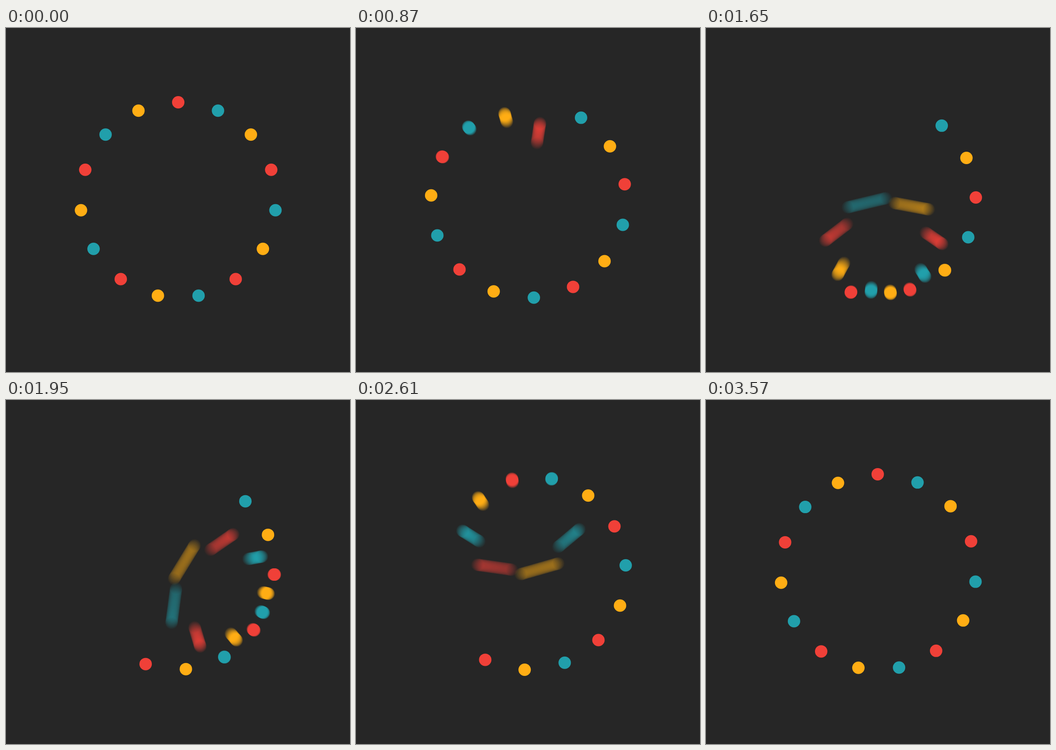
Write an HTML page with a canvas that moves like this. It is 748 px wide and 748 px high and loops after 3600 ms.

```html
<!DOCTYPE html>
<html lang="en">
<head>
<meta charset="utf-8">
<title>Crossing dots</title>
<style>
html, body { margin: 0; width: 100%; height: 100%; overflow: hidden; background: #262626; }
canvas { display: block; filter: blur(0.6px); }
</style>
</head>
<body>
<canvas id="stage" width="748" height="748"></canvas>
<script>
const LOOP = 3600, STEP = 30;
const COUNT = 15, DELAY = 120, CROSS = 1080, RATE = 0.0042;
const CX = 374.5, CY = 374, RING = 212.6, DOT = 13.5;
const SHUTTER = 100, SAMPLES = 51, PATCH = 160;
const COLORS = ['#f04038', '#ffad14', '#219fab'];

const ctx = document.getElementById('stage').getContext('2d');
const layer = document.createElement('canvas');
layer.width = layer.height = PATCH;
const pen = layer.getContext('2d');

// Signed distance from the centre: each dot glides across the ring once per loop.
const reach = tau => -RING * Math.tanh(RATE * (tau - CROSS));

function disc(c, x, y) {
  c.beginPath();
  c.arc(x, y, DOT, 0, 2 * Math.PI);
  c.fill();
}

// Averages the dot over the shutter time in a mask, then tints the mask.
function smear(x, y, ux, uy, tau, color) {
  const r = reach(tau);
  const left = Math.floor(x - PATCH / 2), top = Math.floor(y - PATCH / 2);
  pen.globalCompositeOperation = 'source-over';
  pen.clearRect(0, 0, PATCH, PATCH);
  pen.globalCompositeOperation = 'lighter';
  pen.fillStyle = `rgba(255,255,255,${1 / SAMPLES})`;
  for (let i = 0; i < SAMPLES; i++) {
    const d = reach(tau + SHUTTER * ((i + 0.5) / SAMPLES - 0.5)) - r;
    disc(pen, x + ux * d - left, y + uy * d - top);
  }
  pen.globalCompositeOperation = 'source-in';
  pen.fillStyle = color;
  pen.fillRect(0, 0, PATCH, PATCH);
  // Two passes give the trail its density.
  ctx.drawImage(layer, left, top);
  ctx.drawImage(layer, left, top);
}

// The ring turns 36 degrees per loop; with the crossing that is nine places, so colours line up again.
function draw(t) {
  ctx.fillStyle = '#262626';
  ctx.fillRect(0, 0, 748, 748);
  for (let n = 0; n < COUNT; n++) {
    const tau = t - n * DELAY;
    const a = (t / 100 - n * 360 / COUNT) * Math.PI / 180;
    const ux = Math.sin(a), uy = -Math.cos(a), r = reach(tau);
    const x = CX + ux * r, y = CY + uy * r;
    const color = COLORS[n % 3];
    const trail = Math.abs(reach(tau + SHUTTER / 2) - reach(tau - SHUTTER / 2));
    if (trail > 1.5) {
      smear(x, y, ux, uy, tau, color);
    } else {
      ctx.fillStyle = color;
      disc(ctx, x, y);
    }
  }
}

const start = performance.now();
function tick() {
  const t = (performance.now() - start) % LOOP;
  draw(Math.floor(t / STEP) * STEP);
  requestAnimationFrame(tick);
}
tick();
</script>
</body>
</html>
```
